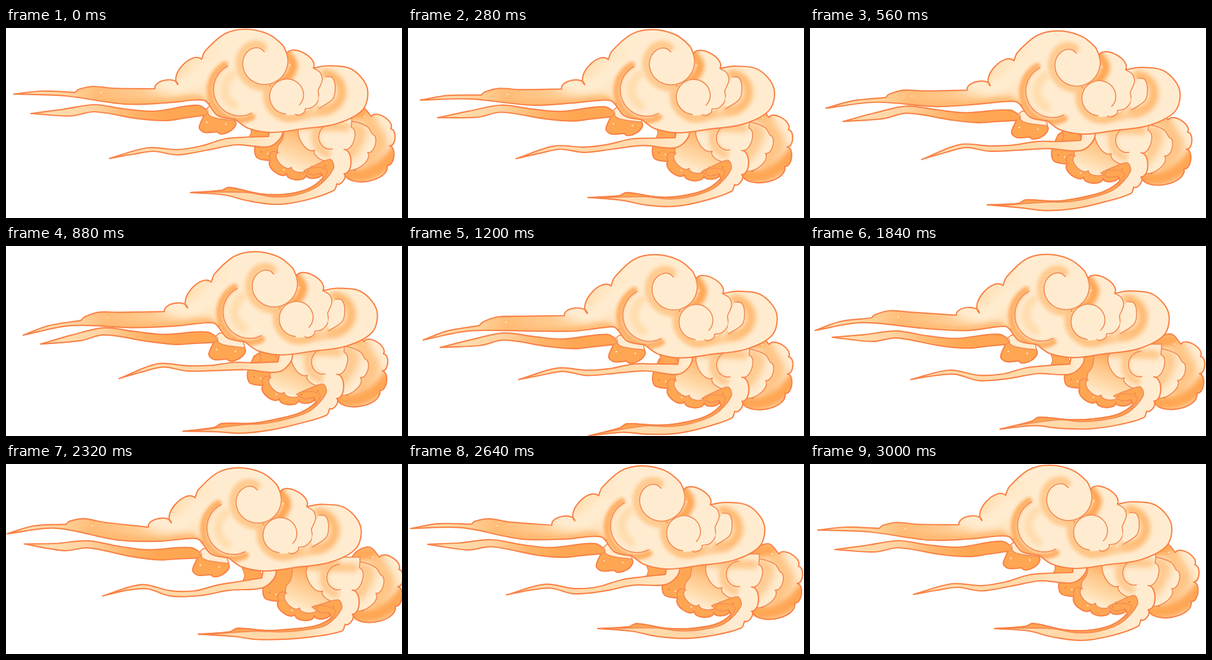
An HTML page with a canvas that plays this animation: 670 px wide and 322 px high, repeating every 3.04 s.

```html
<!DOCTYPE html>
<html lang="en">
<head>
<meta charset="utf-8">
<title>Drifting cloud</title>
<style>
  html, body { margin: 0; width: 100%; height: 100%; overflow: hidden; background: #fff; }
  canvas { display: block; }
</style>
</head>
<body>
<canvas id="stage" width="670" height="322"></canvas>
<script>
const ctx = document.getElementById('stage').getContext('2d');
const LOOP = 3040, CYCLE = 3000, STEP = 40, PI = Math.PI;
const CREAM = '#ffecd0', PALE = '#ffdcae', SOFT = '#ffc586', ORANGE = '#ffa653';
const EDGE = '#f98145', INK = '#f38c55';

// Motion: a slow drop, a sideways swing and a ripple at twice the pace, all zero at the start.
let drop = 0, swing = 0, ripple = 0;
function setTime(t) {
  const a = 2 * PI * t / CYCLE;
  drop = 1 - Math.cos(a);
  swing = Math.sin(a);
  ripple = 1 - Math.cos(2 * a);
}
const mix = (a, b, c) => a * drop + b * swing + c * ripple;
const drift = (bend = 0) => mix(2.5 - bend, 13.5, 0);
// 1 at the tip of a tail, 0 from its root on
const along = (x, tip, root) => Math.min(1, Math.max(0, (root - x) / (root - tip)));

function body(x, y) {
  const u = along(x, 13, 230), bow = Math.sin(PI * u);
  const shoulder = Math.exp(-(((x - 290) / 40) ** 2));
  const dy = mix(7.4 + 15 * u ** 1.5 + 4 * shoulder, 12 * (1 - (1 - u) ** 2),
    (x > 230 ? -1 : -0.5) - 4 * bow - 2 * shoulder);
  return [x + drift(5 * bow), y + dy];
}
function ribbon(x, y) {
  const u = along(x, 42, 330);
  return [x + drift(), y + mix(10 + 2 * u ** 4, 13 * u ** 4, 5 * (1 - u) ** 4 - 3.5)];
}
function streamer(x, y) {
  const u = along(x, 175, 455);
  return [x + drift(), y + mix(9 - 6 * u, -8 * Math.sin(PI * u) ** 2, 3 * Math.sin(2 * PI * u))];
}
const recoil = () => mix(0.5, -13.5, 0);
function trail(x, y) {
  const u = along(x, 312, 540);
  return [x + recoil(), y + mix(9 + 12 * u ** 3, 9 * Math.sin(0.6 * PI * u), -3 * Math.sin(2 * PI * u))];
}
const under = (x, y) => [x + recoil(), y + mix(9.3, 0, 0)];

// Points along an arc whose radius eases from r0 to r1; angles in degrees.
function spiral(cx, cy, r0, r1, from, turn) {
  const pts = [];
  for (let i = 0; i <= 16; i++) {
    const u = i / 16, r = r0 + (r1 - r0) * u ** 5, a = (from + turn * u) * PI / 180;
    pts.push((cx + r * Math.cos(a)).toFixed(1) + ',' + (cy + r * Math.sin(a)).toFixed(1));
  }
  return pts.join(' ');
}

const parse = d => d.split('|').map(run => run.trim().split(/\s+/).map(p => p.split(',').map(Number)));

// Runs are smooth curves with corners at the bars; a run of one point is a round puff.
function path(move, d, closed) {
  const p = new Path2D();
  let last = null;
  for (const run of parse(d)) {
    const pts = run.map(q => move(...q));
    if (last && pts.length === 1) {
      const [ax, ay] = last, [bx, by] = pts[0];
      const nx = (by - ay) * 0.38, ny = (ax - bx) * 0.38;
      p.bezierCurveTo(ax + nx, ay + ny, bx + nx, by + ny, bx, by);
    } else {
      if (last) pts.unshift(last);
      else p.moveTo(...pts[0]);
      addSmooth(p, pts);
    }
    last = pts[pts.length - 1];
  }
  if (closed) p.closePath();
  return p;
}

function addSmooth(p, pts) {
  const gap = k => Math.hypot(pts[k + 1][0] - pts[k][0], pts[k + 1][1] - pts[k][1]) || 1;
  const tangent = (k, c) => {
    const a = Math.max(0, k - 1), b = Math.min(pts.length - 1, k + 1);
    let len = 0;
    for (let j = a; j < b; j++) len += gap(j);
    return (pts[b][c] - pts[a][c]) / len;
  };
  for (let k = 0; k < pts.length - 1; k++) {
    const g = gap(k) / 3, a = pts[k], b = pts[k + 1];
    p.bezierCurveTo(a[0] + tangent(k, 0) * g, a[1] + tangent(k, 1) * g,
      b[0] - tangent(k + 1, 0) * g, b[1] - tangent(k + 1, 1) * g, ...b);
  }
}

function grad(move, x0, y0, x1, y1, ...stops) {
  const g = ctx.createLinearGradient(...move(x0, y0), ...move(x1, y1));
  for (let i = 0; i < stops.length; i += 2) g.addColorStop(stops[i], stops[i + 1]);
  return g;
}

function line(move, d, width = 1.8, color = INK) {
  ctx.lineWidth = width;
  ctx.strokeStyle = color;
  ctx.stroke(path(move, d));
}

// A soft band of shadow along a curve.
function glow(move, d, width, color, blur = 3) {
  ctx.save();
  ctx.filter = `blur(${blur}px)`;
  line(move, d, width, color);
  ctx.restore();
}

function piece(move, d, fill, { width = 2.2, color = EDGE, inside } = {}) {
  const p = path(move, d, true);
  ctx.fillStyle = fill;
  ctx.fill(p);
  if (inside) {
    ctx.save();
    ctx.clip(p);
    inside();
    ctx.restore();
  }
  if (!width) return;
  ctx.lineWidth = width;
  ctx.strokeStyle = color;
  ctx.stroke(p);
}

function specks(move, d, color = '#ffe6c0') {
  ctx.fillStyle = color;
  for (const [x, y] of parse(d)[0]) {
    ctx.beginPath();
    ctx.arc(...move(x, y), 1.4, 0, 7);
    ctx.fill();
  }
}

const thin = { width: 1.8, color: INK }, bare = { width: 0 };

function drawUnder() {
  const m = under;
  // right side, back to front
  piece(m, '565,160 580,140 602,133 618,150 | 651,171 | 649,200 | 645,233 | 572,245', CREAM, {
    inside() {
      glow(m, '575,140 606,146 620,170 632,195 612,225', 26, SOFT, 6);
      glow(m, '565,150 604,142', 18, ORANGE, 5);
      glow(m, '570,250 610,248 640,232 662,208', 24, ORANGE, 5);
    }
  });
  piece(m, '550,160 585,158 611,167 620,180 | 612,211 | 574,237', CREAM, {
    ...thin,
    inside() { glow(m, '560,166 600,172 592,200 580,216', 18, SOFT, 7); }
  });
  // left side
  piece(m, '470,150 550,150 | 545,200 536,244 | 508,249 | 475,247 | 447,225 | 425,220 421,203 432,175', ORANGE);
  piece(m, '470,150 560,150 | 555,190 549,222 | 517,234 | 483,236 | 459,212 | 460,200 468,188 472,160',
    grad(m, 500, 168, 474, 234, 0, ORANGE, 0.35, SOFT, 0.75, PALE, 1, CREAM), thin);
  line(m, '447,225 446,215 452,209 461,211');
  // middle
  piece(m, '500,150 585,150 | 585,158 584,168 | 572,206 | 549,222 | 522,207 | 500,164', CREAM, {
    ...thin,
    inside() {
      glow(m, '498,165 575,168', 14, SOFT, 5);
      glow(m, spiral(552, 185, 29, 29, 255, -150), 12, SOFT, 4);
    }
  });
  line(m, spiral(552, 185, 23, 20, 265, -175));
  specks(m, '443,213 607,150 470,240');
  specks(m, '590,241 432,210', '#e98238');
}

function drawTrail() {
  const m = trail;
  const top = '312,279 365,275 377,270 430,281 470,282 510,273 536,254 533,246';
  const low = '572,206 | 572,247 | 560,264 | 555,275 510,291 460,299 410,293 370,283 312,279';
  piece(m, top + ' | 549,222 558,204 | ' + low,
    grad(m, 312, 279, 575, 240, 0, ORANGE, 0.2, PALE, 0.6, '#ffd6a4', 0.85, CREAM, 1, CREAM), bare);
  piece(m, top + ' | 518,249 504,242 | 524,232 549,223 554,238 528,268 490,283 450,286 410,279 340,278', ORANGE, thin);
  line(m, '508,239 530,236 544,242 532,265', 1.4);
  line(m, top, 2.2, EDGE);
  line(m, low, 2.2, EDGE);
  specks(m, '540,234 512,242', '#e98238');
}

function drawStreamer() {
  const m = streamer;
  piece(m, '405,150 415,175 411,187 | 430,191 448,180 | 448,150', ORANGE, thin);
  piece(m, '175,221 240,203 290,206 330,200 370,188 405,185 444,184 | 452,150 467,150 | 467,182 445,201 390,198 340,207 290,215 250,209 215,214 175,221',
    grad(m, 175, 210, 467, 190, 0, ORANGE, 0.12, PALE, 0.4, '#ffd8a8', 0.7, PALE, 1, CREAM));
}

function drawRibbon() {
  const m = ribbon;
  piece(m, '42,145 95,138 150,130 200,137 250,141 325,131 346,144 | 376,140 388,158 | 358,176 | 336,177 327,169 335,148 | 300,153 270,157 225,154 150,142 110,149 42,145',
    grad(m, 42, 145, 390, 155, 0, SOFT, 0.1, PALE, 0.3, '#ffd3a0', 0.5, '#ffb468', 0.65, ORANGE, 1, ORANGE));
  piece(m, '338,138 345,149 362,154 388,157 | 380,135 345,132', CREAM, thin);
  line(m, '335,148 342,144 341,138', 1.4);
  specks(m, '340,160 372,163');
}

function drawBody() {
  const m = body;
  const outline = '13,112 60,107 117,109 | 123,104 147,99 180,102 252,103 | 291,96 | 331,53'
    + ' | 337,39 370,10 405,2 443,10 468,29 475,43 | 520,68 | 545,64 585,70 611,101 604,138 560,162 500,171 450,177 410,170 388,155'
    + ' | 358,148 338,124 322,122 270,127 200,129 100,115 13,112';
  const fill = grad(m, 13, 112, 375, 110, 0, ORANGE, 0.08, PALE, 0.26, '#ffd29a', 0.4, '#ffbd78', 0.6, '#ffcb90', 0.82, '#ffe3bb', 1, CREAM);
  const big = spiral(437, 56, 40, 16, -19, 289);
  const small = spiral(476, 116, 30, 25, 95, 300);
  const curl = spiral(396, 104, 45, 45, 242, -178);
  piece(m, outline, fill, {
    inside() {
      glow(m, '250,90 300,98 345,66', 26, CREAM, 7);
      glow(m, '150,126 270,126 325,120 342,134', 12, '#ffb76e', 5);
      // left curl
      glow(m, spiral(396, 106, 51, 49, 240, -175), 11, '#ffb066', 2.5);
      glow(m, spiral(402, 104, 32, 32, 235, -115), 14, '#ffdbab', 4);
      line(m, curl);
      // shadows behind the swirls
      glow(m, spiral(437, 58, 42, 26, 90, 175), 14, '#ffca8e');
      glow(m, spiral(480, 114, 38, 38, 230, -195), 14, SOFT);
      glow(m, spiral(537, 108, 31, 31, -85, 185), 15, '#ffb970', 4);
      glow(m, '545,140 510,148 470,150', 10, SOFT, 4);
      // middle lobe
      piece(m, '475,43 | 520,68 | 531,75 535,88 528,106 | 529,121 519,134 497,146 | 470,146 450,120 455,95 470,80', CREAM, {
        ...bare,
        inside() { glow(m, '474,42 486,62 478,82 462,94', 15, ORANGE, 3.5); }
      });
      line(m, '520,68 531,75 535,88 528,106 | 529,121 519,134 506,137 | 490,146');
      // right lobe
      piece(m, '541,82 552,84 557,100 553,120 530,136 | 529,120 535,100', CREAM, bare);
      line(m, '541,82 552,84 557,100 553,120 530,136');
      for (const d of [small, big]) {
        piece(m, d, CREAM, bare);
        line(m, d);
      }
    }
  });
  specks(m, '161,110 480,63');
  specks(m, '447,98 344,128', '#f08c40');
}

function draw(now) {
  const t = Math.floor((now % LOOP) / STEP) * STEP;
  setTime(t % CYCLE);
  ctx.fillStyle = '#fff';
  ctx.fillRect(0, 0, 670, 322);
  ctx.lineJoin = ctx.lineCap = 'round';
  drawUnder();
  drawTrail();
  drawStreamer();
  drawRibbon();
  drawBody();
}

const start = performance.now();
function tick() {
  draw(performance.now() - start);
  requestAnimationFrame(tick);
}
tick();
</script>
</body>
</html>
```
